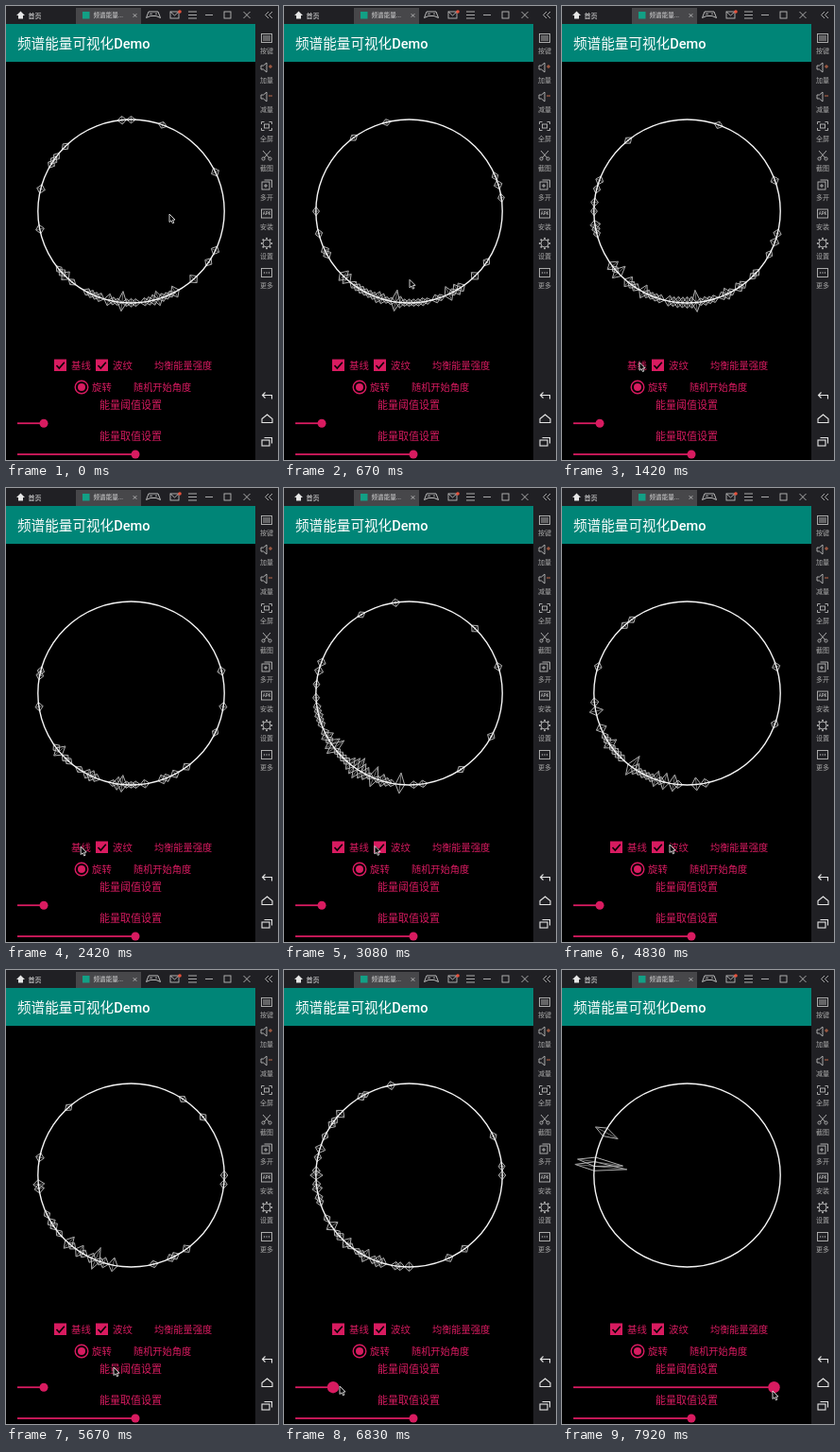
Write an HTML page with a canvas that moves like this. It is 288 px wide and 480 px high and loops after 8 s.

```html
<!DOCTYPE html>
<html lang="zh-CN">
<head>
<meta charset="utf-8">
<title>频谱</title>
<style>
html, body { margin: 0; width: 100%; height: 100%; overflow: hidden; background: #000; }
canvas { display: block; width: 288px; height: 480px; }
</style>
</head>
<body>
<canvas id="stage"></canvas>
<script>
const LOOP = 8000, RATE = 12, STEPS = 96;
const CX = 132.5, CY = 217, RX = 98.7, RY = 97, BINS = 128;
const ACCENT = '#d81b60', GREY = '#b9b9b9', WHITE = '#e6e6e6', DARK = '#202024';
const SANS = 'Roboto, "Noto Sans CJK SC", "Noto Sans CJK", sans-serif';

const canvas = document.getElementById('stage');
const scale = Math.max(1, window.devicePixelRatio || 1);
canvas.width = 288 * scale;
canvas.height = 480 * scale;
const ctx = canvas.getContext('2d');

// Music: [step, centre of the energy in degrees, spread, density, greatest height]
const music = [
  [0, 88, 42, 0.8, 10],
  [17, 95, 58, 0.85, 11],
  [29, 115, 36, 0.8, 9],
  [47, 132, 58, 1, 17],
  [68, 122, 52, 0.4, 10],
  [82, 160, 58, 0.5, 10],
  [95, 197, 30, 0.8, 26]
];
const pointerPath = [
  [0, 173, 220], [4, 173, 220], [13, 83, 376], [34, 78, 380],
  [40, 114, 377], [58, 114, 377], [68, 114, 420], [76, 42, 440], [82, 59, 440], [95, 223, 445]
];
const thumbPath = [[0, 40], [77, 40], [82, 52], [95, 224.5]];

function at(path, step) {
  const i = Math.max(1, path.findIndex(key => key[0] >= step));
  const [from, ...a] = path[i - 1], [to, ...b] = path[i];
  const u = (step - from) / (to - from);
  return a.map((v, n) => v + (b[n] - v) * u);
}

function rand(a, b) {
  let h = Math.imul(a + 1, 374761393) ^ Math.imul(b + 7, 668265263);
  h = Math.imul(h ^ (h >>> 13), 1274126177);
  return ((h ^ (h >>> 16)) >>> 0) / 4294967296;
}

// Peaks crowd around a drifting centre; the threshold slider removes the weak ones
function spectrum(step) {
  const [centre, spread, density, top] = at(music, step);
  const threshold = (at(thumbPath, step)[0] - 52) / 16;
  const peaks = [];
  for (let bin = 0; bin < BINS; bin++) {
    const angle = bin * 360 / BINS;
    const away = (angle - centre + 540) % 360 - 180;
    const energy = Math.exp(-((away / spread) ** 2));
    const chance = 0.08 + density * energy;
    const height = 3.2 + rand(bin, step) + (top - 3.2) * energy * rand(step + 200, bin) ** 4;
    if (rand(bin, 500 + Math.floor(step / 3)) < chance && height > threshold) peaks.push([angle, height]);
  }
  return peaks;
}

function trace(points, close) {
  ctx.beginPath();
  for (let i = 0; i < points.length; i += 2) ctx.lineTo(points[i], points[i + 1]);
  if (close) ctx.closePath();
}
function stroke(points, color = GREY, width = 0.9, close = false) {
  trace(points, close);
  ctx.strokeStyle = color;
  ctx.lineWidth = width;
  ctx.stroke();
}
function fill(points, color) {
  trace(points, true);
  ctx.fillStyle = color;
  ctx.fill();
}
function rect(x, y, w, h, color) {
  ctx.fillStyle = color;
  ctx.fillRect(x, y, w, h);
}
function box(x, y, w, h, color = GREY, width = 0.9) {
  ctx.strokeStyle = color;
  ctx.lineWidth = width;
  ctx.strokeRect(x, y, w, h);
}
function disc(x, y, r, color) {
  ctx.beginPath();
  ctx.arc(x, y, r, 0, 7);
  ctx.fillStyle = color;
  ctx.fill();
}
function oval(x, y, rx, ry = rx, color = GREY, width = 0.9) {
  ctx.beginPath();
  ctx.ellipse(x, y, rx, ry, 0, 0, 7);
  ctx.strokeStyle = color;
  ctx.lineWidth = width;
  ctx.stroke();
}
function text(str, x, y, size, color = ACCENT, weight = 400, align = 'left') {
  ctx.font = `${weight} ${size}px ${SANS}`;
  ctx.textAlign = align;
  ctx.fillStyle = color;
  ctx.fillText(str, x, y + size * 0.36);
}
function cross(x, y, r) {
  stroke([x - r, y - r, x + r, y + r]);
  stroke([x + r, y - r, x - r, y + r]);
}

function titleBar() {
  rect(0, 0, 288, 19, DARK);
  rect(74, 2, 69, 17, '#47474a');
  fill([11, 10, 15.5, 5.5, 20, 10, 18, 10, 18, 13.5, 13, 13.5, 13, 10], WHITE);
  text('首页', 23.5, 10, 7, '#f2f2f2', 500);
  rect(81, 6, 7.5, 7.5, '#12a085');
  text('频谱能量...', 92.5, 10, 6.6, '#d6d6d6');
  cross(136.5, 10, 1.8);
  stroke([151, 6, 161, 6, 163.5, 12.5, 159, 10.5, 153, 10.5, 148.5, 12.5], GREY, 1, true);
  stroke([152, 8.3, 155, 8.3]);
  disc(159, 8.3, 0.8, GREY);
  box(174, 6, 9, 7);
  stroke([174, 6, 178.5, 10, 183, 6]);
  disc(184, 6, 1.8, '#e8503a');
  [6, 9.5, 13].forEach(y => stroke([193, y, 202, y]));
  stroke([211, 9.5, 219, 9.5]);
  box(231, 6, 7, 7);
  cross(255, 9.5, 3.5);
  [276, 280].forEach(x => stroke([x + 2, 6, x - 1.5, 9.5, x + 2, 13]));
}

function speaker(plus) {
  stroke([-6, -2, -3.5, -2, 0, -5, 0, 5, -3.5, 2, -6, 2], GREY, 0.9, true);
  stroke([2, -1, 6, -1], '#cf7050');
  if (plus) stroke([4, -3, 4, 1], '#cf7050');
}
const tools = {
  按键() {
    box(-5.5, -4.5, 11, 9);
    [-2, 0, 2].forEach(y => stroke([-4, y, 4, y]));
  },
  加量: () => speaker(true),
  减量: () => speaker(false),
  全屏() {
    for (const x of [-1, 1]) for (const y of [-1, 1])
      stroke([x * 2.5, y * 4.5, x * 5.5, y * 4.5, x * 5.5, y * 2]);
    box(-2.5, -2, 5, 4);
  },
  截图() {
    for (const x of [-1, 1]) {
      stroke([x * 4, -5, -x * 3, 3]);
      oval(x * 3.5, 3.5, 1.6);
    }
  },
  多开() {
    box(-5, -3, 8, 8);
    stroke([-2.5, -5, 5.5, -5, 5.5, 3]);
    stroke([-3, 1, 1, 1]);
    stroke([-1, -1, -1, 3]);
  },
  安装() {
    box(-5.5, -5, 11, 9);
    text('APK', 0, -0.3, 4.5, GREY, 500, 'center');
  },
  设置() {
    oval(0, 0, 4);
    for (let a = 0; a < 6.2; a += Math.PI / 4) disc(5.2 * Math.cos(a), 5.2 * Math.sin(a), 1, GREY);
  },
  更多() {
    box(-5.5, -4.5, 11, 9);
    [-2.5, 0, 2.5].forEach(x => disc(x, 0, 0.7, GREY));
  }
};

function sideBar() {
  rect(264, 19, 24, 461, DARK);
  Object.entries(tools).forEach(([label, icon], i) => {
    ctx.save();
    ctx.translate(276, 34 + i * 31);
    icon();
    text(label, 0, 13.3, 7, '#a8a8a8', 400, 'center');
    ctx.restore();
  });
  stroke([274.5, 408.5, 271.5, 411.5, 274.5, 414.5], WHITE, 1.1);
  stroke([271.5, 411.5, 281.5, 411.5, 281.5, 415.5], WHITE, 1.1);
  stroke([271, 436.5, 276.5, 432, 282, 436.5, 282, 440.5, 271, 440.5], WHITE, 1.1, true);
  box(271, 459, 8, 6, WHITE, 1.1);
  stroke([273.5, 456.5, 281.5, 456.5, 281.5, 462.5], WHITE, 1.1);
}

function spot(deg, offset) {
  const a = deg * Math.PI / 180;
  return [CX + (RX + offset) * Math.cos(a), CY + (RY + offset) * Math.sin(a)];
}

function drawSpectrum(step, ripple) {
  const half = 360 / BINS;
  for (const [angle, height] of spectrum(step)) {
    const outer = spot(angle, height), inner = spot(angle, -height * (1 + height / 30));
    if (ripple) stroke([...spot(angle - half, 0), ...outer, ...spot(angle + half, 0), ...inner], '#c4c4c4', 0.9, true);
    stroke([...outer, ...inner], '#8c8c8c', 0.8);
  }
  if (ripple) oval(CX, CY, RX, RY, '#f4f4f4', 1.4);
}

function checkBox(x, label, on) {
  if (on) {
    rect(x, 373.5, 13, 12.5, ACCENT);
    stroke([x + 2.5, 380, x + 5.3, 383, x + 10.8, 376.8], '#000', 1.6);
  }
  text(label, x + 18, 380, 10.4);
}
function slider(x, y, r) {
  rect(12, y - 0.9, x - 12, 1.8, ACCENT);
  disc(x, y, r, ACCENT);
}

function controls(step, ripple) {
  checkBox(51, '基线', step < 14 || step >= 34);
  checkBox(95, '波纹', ripple);
  text('均衡能量强度', 157, 380, 10.2);
  oval(80, 403, 6.8, 6.8, ACCENT, 1.4);
  disc(80, 403, 4, ACCENT);
  text('旋转', 91, 403, 10.4);
  text('随机开始角度', 135, 403, 10.2);
  text('能量阈值设置', 99, 422, 11);
  text('能量取值设置', 99, 455, 11);
  slider(at(thumbPath, step)[0], 441.2, step >= 77 ? 6.2 : 4.5);
  slider(137, 474, 4.5);
}

function pointer(x, y) {
  ctx.save();
  ctx.translate(x, y);
  const arrow = [0, 0, 0, 8.5, 2, 6.8, 3.4, 9.8, 4.8, 9.2, 3.5, 6.2, 6, 6];
  fill(arrow, '#000');
  stroke(arrow, WHITE, 0.9, true);
  ctx.restore();
}

function draw(step) {
  const ripple = step < 41 || step >= 56;
  ctx.setTransform(scale, 0, 0, scale, 0, 0);
  rect(0, 0, 288, 480, '#000');
  rect(0, 19, 264, 40, '#008577');
  text('频谱能量可视化Demo', 12, 39.8, 14.6, '#fff', 500);
  titleBar();
  sideBar();
  drawSpectrum(step, ripple);
  controls(step, ripple);
  pointer(...at(pointerPath, step));
}

const start = performance.now();
let shown = -1;
function tick() {
  const time = (performance.now() - start) % LOOP;
  const step = Math.min(STEPS - 1, Math.floor((time + 5) * RATE / 1000));
  if (step !== shown) draw(shown = step);
  requestAnimationFrame(tick);
}
tick();
</script>
</body>
</html>
```
